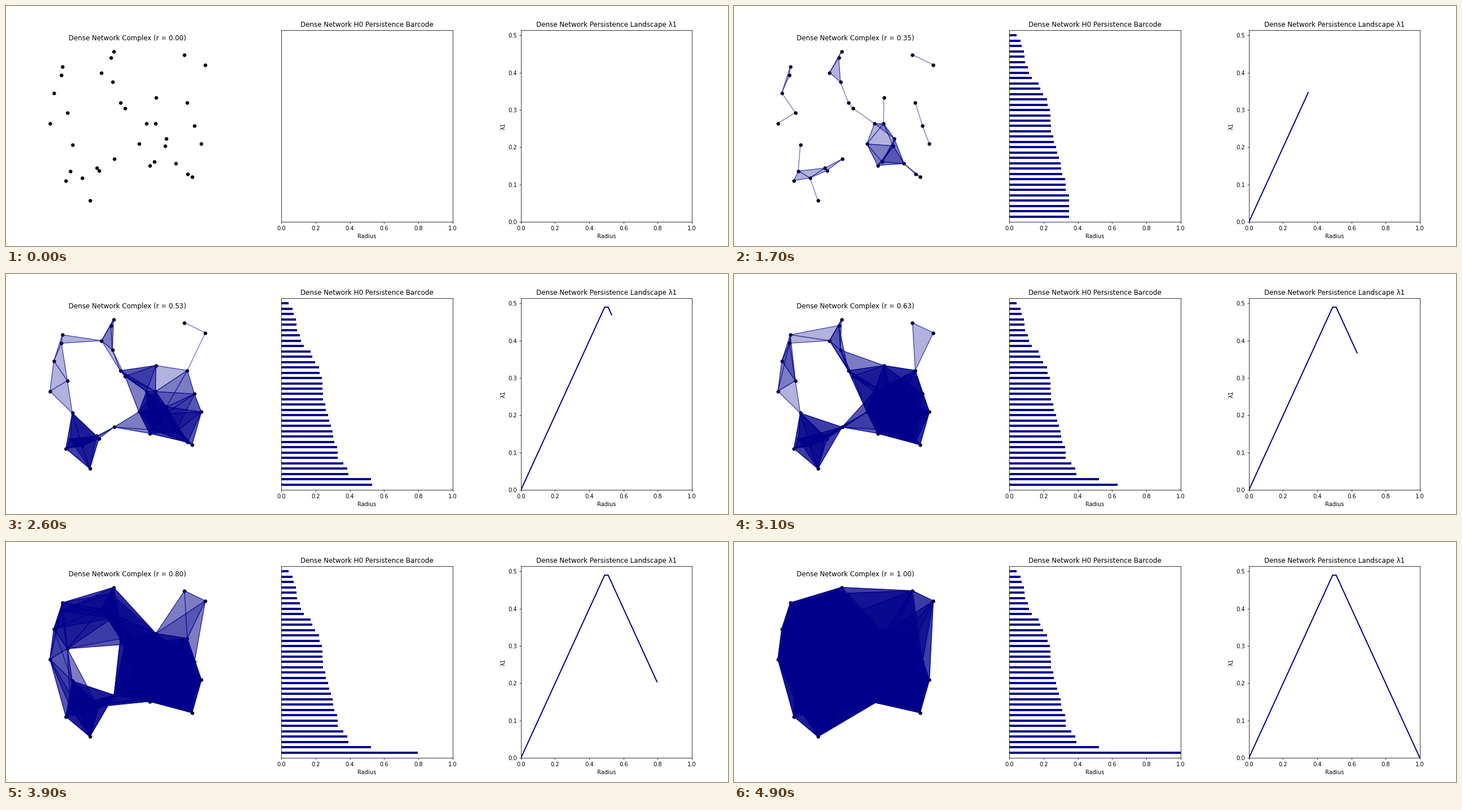
A matplotlib script that plays this animation: 1280 by 427 pixels, repeating every 5 s.

```python
from itertools import combinations

import matplotlib.pyplot as plt
import numpy as np
from matplotlib.animation import FuncAnimation
from matplotlib.collections import LineCollection, PolyCollection

WIDTH, HEIGHT, DPI = 1280, 427, 1280 / 18
FRAMES, INTERVAL = 50, 100
COLOR = "darkblue"
UNIT = 142.2  # pixels per unit of radius

SITES = [
    (191, 81), (186, 92), (100, 108.5), (98.5, 123.5), (169.7, 119),
    (189, 135.5), (317, 87), (354, 105), (85, 155), (109, 190.3),
    (78, 209), (203, 172.5), (211.5, 182.5), (266.3, 163.2), (322, 172),
    (334.7, 214), (249.5, 209.7), (265.6, 209.7), (236, 246), (285, 237),
    (282.8, 249.5), (347, 246), (117.8, 248), (192, 273), (255, 284.2),
    (263, 278), (302, 281), (322.5, 300), (330.4, 304.4), (161, 289),
    (165, 293.5), (114.2, 294.3), (106.4, 311.2), (135, 306.4), (149, 347),
]
points = (np.array(SITES) - (216, 214)) * (1, -1) / UNIT
count = len(points)
dist = np.linalg.norm(points[:, None] - points[None], axis=2)

pairs = np.array(list(combinations(range(count), 2)))
pair_birth = dist[pairs[:, 0], pairs[:, 1]]
triples = np.array(list(combinations(range(count), 3)))
triple_birth = np.max(
    [dist[triples[:, a], triples[:, b]] for a, b in ((0, 1), (0, 2), (1, 2))], axis=0
)


def component_deaths():
    """Radii at which components merge, the surviving one ending at 1."""
    label = np.arange(count)
    deaths = [1.0]
    for k in np.argsort(pair_birth):
        a, b = label[pairs[k]]
        if a != b:
            label[label == b] = a
            deaths.append(pair_birth[k])
    return np.sort(deaths)[::-1]


radii = np.linspace(0, 1, FRAMES)
deaths = component_deaths()
landscape = np.max([np.clip(np.minimum(radii, d - radii), 0, None) for d in deaths], axis=0)

fig, (net_ax, bar_ax, land_ax) = plt.subplots(
    1, 3, figsize=((WIDTH + 1e-6) / DPI, (HEIGHT + 1e-6) / DPI), dpi=DPI
)
fig.subplots_adjust(left=0.05, right=0.95, bottom=0.1, top=0.9, wspace=0.4)

net_ax.scatter(*points.T, color="black", s=30, zorder=1)
net_ax.set_aspect("equal")
net_ax.axis("off")
net_ax.set_xlim(net_ax.get_xlim())
net_ax.set_ylim(net_ax.get_ylim())
faces = PolyCollection([], color=COLOR, alpha=0.3, linewidth=1, joinstyle="miter", zorder=1)
edges = LineCollection([], color=COLOR, alpha=0.5, linewidth=1.5,
                       capstyle="projecting", zorder=2)
net_ax.add_collection(faces, autolim=False)
net_ax.add_collection(edges, autolim=False)

bars = LineCollection([], color=COLOR, linewidth=4, capstyle="butt", zorder=2)
bar_ax.add_collection(bars, autolim=False)
bar_ax.set(xlim=(0, 1), ylim=(-1, count), yticks=[], xlabel="Radius",
           title="Dense Network H0 Persistence Barcode")

(curve,) = land_ax.plot([], [], color=COLOR, linewidth=2)
land_ax.set(xlim=(0, 1), ylim=(0, landscape.max() * 1.05), xlabel="Radius", ylabel="λ1",
            title="Dense Network Persistence Landscape λ1")


def update(frame):
    r = radii[frame]
    net_ax.set_title(f"Dense Network Complex (r = {r:.2f})")
    edges.set_segments(points[pairs[pair_birth <= r]])
    faces.set_verts(points[triples[triple_birth <= r]])
    bars.set_segments(
        [[(0, i), (min(d, r), i)] for i, d in enumerate(deaths)] if r > 0 else []
    )
    shown = frame + 1 if frame else 0
    curve.set_data(radii[:shown], landscape[:shown])
    return faces, edges, bars, curve


anim = FuncAnimation(fig, update, frames=FRAMES, interval=INTERVAL,
                     repeat=True, repeat_delay=0, blit=False)
plt.show()
```
